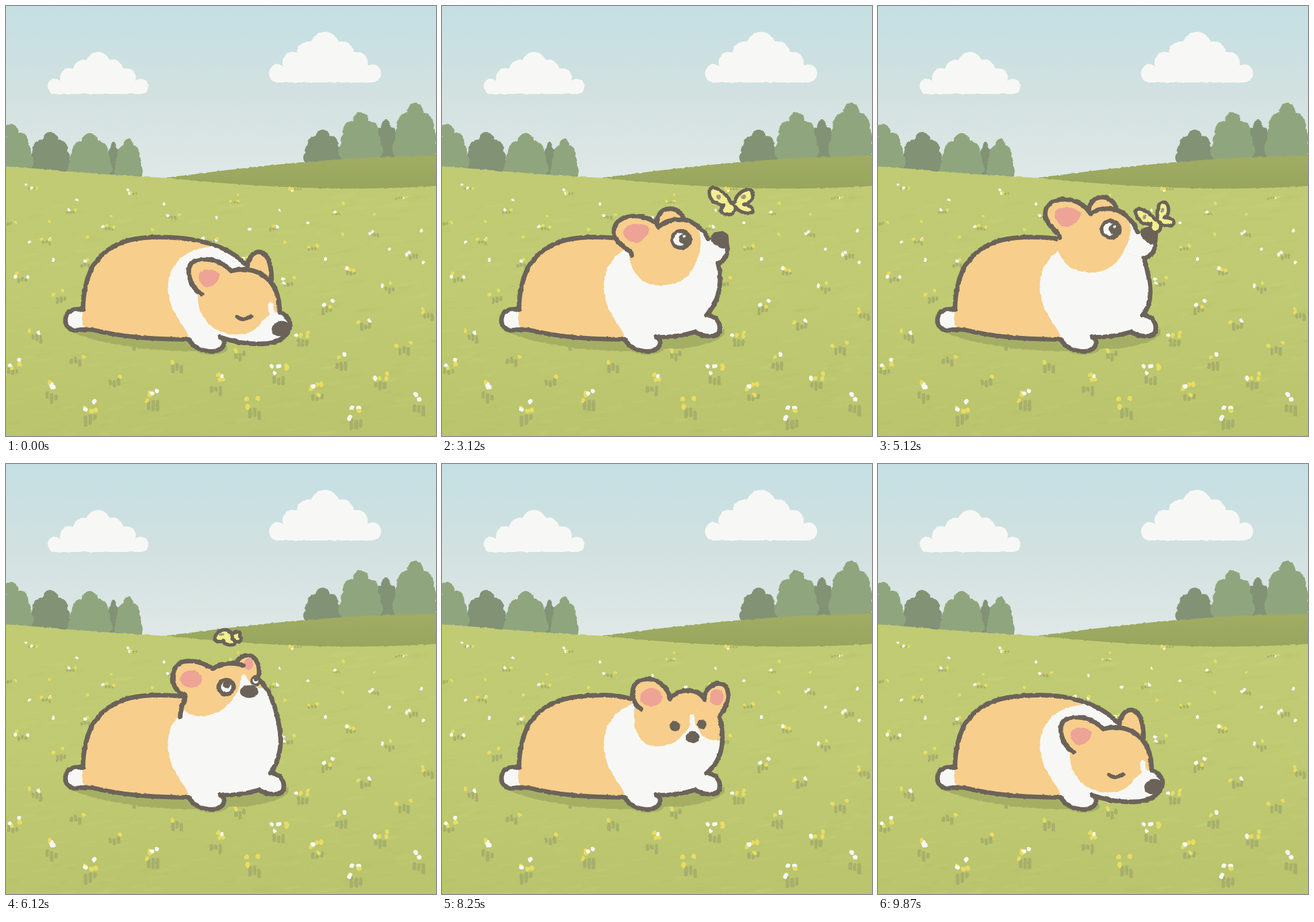
These frames come from a looping animation (748 by 748 pixels, 10 s). An HTML page with a canvas:

```html
<!DOCTYPE html>
<html lang="en">
<meta charset="utf-8">
<title>Corgi and butterfly</title>
<style>
  html, body { margin: 0; width: 100%; height: 100%; overflow: hidden; background: linear-gradient(#c5dfe3 0 38%, #bcc76f 42%); }
  canvas { display: block; width: 748px; height: 748px; filter: url(#rough); }
  svg { position: absolute; }
</style>
<svg width="0" height="0">
  <filter id="rough" x="0" y="0" width="1" height="1" color-interpolation-filters="sRGB">
    <feTurbulence type="fractalNoise" baseFrequency=".12" numOctaves="2" seed="4"/>
    <feColorMatrix values="1 0 0 0 0  0 1 0 0 0  0 0 1 0 0  0 0 0 0 1" result="noise"/>
    <feDisplacementMap in="SourceGraphic" in2="noise" scale="3.5" xChannelSelector="R" yChannelSelector="G"/>
  </filter>
</svg>
<canvas id="stage" width="748" height="748"></canvas>
<script>
const SIZE = 748, FRAME = 125, FRAMES = 80;
const INK = '#6b6359', COAT = '#f7ce8b', WHITE = '#f7f8f5', PINK = '#eda396', YELLOW = '#e9dc62';
const stage = document.getElementById('stage').getContext('2d');
const meadow = document.createElement('canvas');
meadow.width = meadow.height = SIZE;
let ctx = meadow.getContext('2d');

let seed = 77;
const rand = (lo, hi) => lo + (hi - lo) * ((seed = seed * 16807 % 2147483647) / 2147483647);
const ramp = (i, from, to) => Math.min(1, Math.max(0, (i - from) / (to - from)));

function paint(d, fill, line, width = 8) {
  const path = new Path2D(d);
  if (fill) { ctx.fillStyle = fill; ctx.fill(path); }
  if (line) {
    ctx.strokeStyle = line;
    ctx.lineWidth = width;
    ctx.lineCap = ctx.lineJoin = 'round';
    ctx.stroke(path);
  }
}

function oval(x, y, rx, ry, fill, turn = 0) {
  ctx.fillStyle = fill;
  ctx.beginPath();
  ctx.ellipse(x, y, rx, ry, turn, 0, 7);
  ctx.fill();
}

function fade(y0, y1, ...colors) {
  const g = ctx.createLinearGradient(0, y0, 0, y1);
  colors.forEach((c, i) => g.addColorStop(i / (colors.length - 1), c));
  return g;
}

// ---- Scenery ----
function cloud(x, bottom, w, h) {
  let base = `M${x - w * .42} ${bottom}`;
  for (let i = -3; i <= 3; i++) {
    const rise = (1 - Math.abs(i) / 3) ** .85, r = h * (.18 + .11 * rise);
    const px = x + i / 3 * (w / 2 - h * .18), py = bottom - h * .18 - h * .53 * rise;
    oval(px, py, r, r, WHITE);
    base += `L${px} ${py}`;
  }
  paint(`${base}L${x + w * .42} ${bottom}Z`, WHITE);
}

function tree(x, top, w, bottom, color) {
  const h = bottom - top;
  oval(x, top + .23 * h, .38 * w, .23 * h, color);
  for (let row = 1; row < 4; row++)
    for (const side of [-1, 1])
      oval(x + side * (.24 + .11 * row) * w, top + (.18 + .21 * row) * h, .46 * w, .21 * h, color);
  paint(`M${x} ${top + .2 * h} L${x + .8 * w} ${bottom + 6} L${x - .8 * w} ${bottom + 6}Z`, color);
}

// Tufts and flowers spread evenly by the golden ratio, larger towards the front
function flowers(count, tufted) {
  for (let i = 0; i < count; i++) {
    const x = (i * .618 + .06) % 1 * SIZE, y = 316 + i / count * (tufted ? 405 : 150) + rand(-6, 6);
    const near = (y - 300) / 430, size = 2.2 + 1.5 * near;
    if (tufted)
      for (let n = 0; n < 3; n++) {
        const left = x + (n - 1) * size * 2.2, low = y + rand(0, 8 * near);
        paint(`M${left} ${low} L${left} ${low + rand(3, 16) * near}`, null, '#a6b06b', 3.5 + 3 * near);
      }
    const blooms = tufted ? Math.round(rand(1, 2 + 4 * near)) : 1;
    for (let n = 0; n < blooms; n++)
      oval(x + rand(-14, 14), y - rand(0, 24) * near, size * 1.2, size, rand(0, 1) < .55 ? YELLOW : WHITE, rand(0, 3));
  }
}

function drawMeadow() {
  ctx.fillStyle = fade(0, 300, '#c4dfe3', '#d2e1e0', '#dfe8e6');
  ctx.fillRect(0, 0, SIZE, SIZE);
  cloud(160, 153, 175, 73);
  cloud(555, 133, 195, 88);

  const light = '#8fa57d', dark = '#829275';
  tree(661, 198, 24, 270, dark);
  tree(551, 215, 33, 275, dark);
  tree(617, 185, 38, 268, light);
  tree(712, 168, 39, 266, light);
  tree(187, 236, 14, 298, dark);
  tree(77, 219, 37, 292, dark);
  tree(8, 205, 39, 286, light);
  tree(146, 221, 38, 296, light);
  tree(213, 230, 24, 300, light);

  paint('M266 300 C380 287 520 264 748 260 L748 325 L266 325Z', fade(260, 320, '#a0ad62', '#98a55d'));
  paint('M0 279 C90 285 180 295 280 299 C400 311 560 325 748 313 L748 748 L0 748Z', fade(280, 748, '#c0cb74', '#bfca72', '#b9c46d'));
  for (let i = 0; i < 400; i++)
    oval(rand(0, SIZE), rand(330, SIZE), rand(6, 24), rand(1, 4), i % 3 ? 'rgba(205,218,120,.12)' : 'rgba(165,178,92,.08)', -.15);
  flowers(32, false);
  flowers(54, true);
}

// ---- Dog ----
const BACK = 'C208 402 174 417 150 454 C138 479 134 505 134 528 ';
const TAIL = 'C130 528 122 526 115 529 C101 534 100 553 110 561 C120 568 135 560 150 563 ';
const BELLY = 'C200 576 260 580 318 580 ';
const LEG = 'C326 594 342 601 358 601 C380 601 386 580 372 576 ';
const PAW = 'C400 577 420 573 440 567 C452 574 470 577 479 572 C488 562 483 538 460 538';
const CHEST = ' L380 560 L320 520Z';

const frontHigh = {
  ear: 'M303 440 C304 410 322 404 304 398 C284 388 286 350 308 344 C326 340 344 346 360 356 ',
  brow: 'C374 346 396 344 413 351 ',
  farEar: '401 346 C408 328 436 326 440 356 C441 364 439 370 437 373 ',
  cheek: 'C466 395 476 450 478 480 C477 505 470 525 460 538',
  mask: 'L412 366 C406 380 408 392 396 405 C385 425 365 438 340 438 C318 438 306 430 304 412',
  farMask: 'L452 390 C436 392 424 384 417 368 L412 366Z',
  blaze: 'M413 370 L416 385',
  pink: '322 374 19 15',
  farPink: '422 348 8 10',
  nose: '423 396 16 11',
  eye: '383 388 17 16 9',
  farEye: '434 377 9 10 5'
};
const frontLow = {
  ear: 'M346 426 C335 418 330 408 332 392 C335 376 352 372 366 375 C384 380 396 394 396 409 ',
  brow: 'C410 390 444 388 457 410 ',
  farEar: '457 410 C452 392 480 372 494 387 C503 402 494 425 482 440 ',
  cheek: 'C488 455 489 480 486 495 C482 515 472 528 460 538',
  mask: 'L437 438 C432 460 425 465 415 475 C402 488 392 491 372 491 C345 490 328 462 336 418',
  farMask: 'L485 481 C455 484 444 465 437 438 L437 438Z',
  blaze: 'M435 440 L435 466',
  pink: '364 406 19 16',
  farPink: '478 406 12 14',
  nose: '436 475 12 10.5',
  eye: '405 456 9 9 0',
  farEye: '452 453 8 8 0'
};

// Blends two poses number by number
function blend(a, b, k) {
  const pose = {};
  for (const key in a) {
    const ends = b[key].match(/[\d.]+/g);
    let i = 0;
    pose[key] = a[key].replace(/[\d.]+/g, n => +n + (ends[i++] - n) * k);
  }
  return pose;
}
const nums = s => s.split(' ').map(Number);

function drawBody(asleep, breath) {
  const top = `${265 + 18 * breath} 402 `;
  const start = asleep ? `M415 448 C385 416 330 402 ${top}` : `M340 412 C318 404 292 402 ${top}`;
  const coat = asleep ? `M350 413 C322 404 300 402 ${top}` : start;
  const collar = asleep ? '300 425 354 419Z' : '295 430 338 414Z';
  paint('M112 566 C160 590 270 602 330 600 C350 612 385 606 386 596 ' +
    (asleep ? 'L380 580 L150 560Z' : 'C420 600 500 585 491 562 L440 560 L150 560Z'), '#a5af64');
  const outline = start + BACK + TAIL + BELLY + LEG + (asleep ? '' : PAW);
  paint(outline, WHITE);
  paint(`${coat}${BACK}C130 540 133 552 138 562 L150 563 ${BELLY}C318 560 290 545 282 500 C278 460 ${collar}`, COAT);
  paint(outline, null, INK);
}

function drawSleepingHead(breath) {
  const ear = 'M340 501 C318 488 312 455 324 446 C345 434 375 443 392 461 ';
  const brow = 'C430 450 476 470 476 532 ';
  const snout = `C488 538 ${495 + breath} 546 ${494 + breath} 556 C492 572 478 584 455 587 C425 590 395 584 372 576`;
  paint('M420 452 C424 420 462 412 462 476', COAT, INK);
  paint(`${ear}${brow}${snout} L345 570 L325 530Z`, WHITE);
  paint(`${ear}${brow}C462 534 452 540 444 550 C436 564 422 571 400 571 C365 572 330 545 334 498Z`, COAT);
  paint('M460 520 C460 527 463 532 464 540', null, WHITE, 9);
  paint('M336 466 C340 457 364 455 372 467 C370 478 362 487 352 490 C342 489 333 478 336 466', PINK);
  paint(ear + brow + snout, null, INK);
  paint('M402 541 C408 546 420 546 426 540', null, INK, 7);
  oval(478 + breath, 561, 16, 13, INK, -.3);
}

// Looking right; lift 1 raises the head and tips the nose down
function drawSideHead(lift) {
  const top = 'M330 433 C328 421 301 417 299 393 C298 361 355 355 377 384 C395 368 425 366 443 382 ';
  const bridge = 'C452 388 459 396 463 405 ';
  const muzzle = '495 412 C500 432 491 446 480 447';
  const pose = new DOMMatrix().translate(414 - 11 * lift, 406 - 18 * lift).rotate(8 * lift).translate(-414, -406);
  const nape = pose.transformPoint({ x: 330, y: 433 }), chin = pose.transformPoint({ x: 480, y: 447 });
  const throat = `${chin.x} ${chin.y} C${chin.x + 8} ${chin.y + 30} 484 512 460 538`;
  paint(`M${nape.x} ${nape.y} L${throat}${CHEST}`, WHITE);
  paint('M' + throat, null, INK);

  ctx.save();
  ctx.transform(pose.a, pose.b, pose.c, pose.d, pose.e, pose.f);
  paint('M373 378 C375 346 410 346 420 368', COAT, INK);
  paint(`${top}${bridge}L${muzzle}Z`, WHITE);
  paint(`${top}C455 405 450 425 442 445 C432 473 410 486 378 486 C345 486 327 460 326 432Z`, COAT);
  paint('M316 390 C320 378 350 374 361 386 C362 394 348 412 338 413 C328 412 312 402 316 390', PINK);
  paint(top + bridge, null, INK);
  paint('M' + muzzle, null, INK);
  paint('M468 404 C468 394 490 388 497 399 C499 412 499 418 490 421 C482 420 470 412 468 404', INK, INK, 2);
  oval(416, 406, 19, 18, INK);
  oval(414, 406, 11, 11, WHITE);
  oval(421, 405, 9, 9, INK);
  oval(422, 401, 2.5, 2.5, WHITE);
  ctx.restore();
}

function drawFrontEye(spec, lid) {
  const [x, y, rx, ry, white] = nums(spec), r = Math.max(white, 0);
  oval(x, y, rx, Math.max(ry * lid, 2.5), INK);
  oval(x, y, r, r, WHITE);
  oval(x + r * .1, y - r * .45, r * .75, r * .65, INK);
}

function drawFrontHead(p, lid) {
  const top = p.ear + p.brow;
  paint(`${top}L${p.farEar}${p.cheek}${CHEST}`, WHITE);
  paint(`${top}${p.mask}Z`, COAT);
  paint(`M${p.farEar}${p.farMask}`, COAT);
  paint(p.blaze, null, WHITE, 9);
  oval(...nums(p.pink), PINK);
  oval(...nums(p.farPink), PINK);
  paint(top, null, INK);
  paint(`M${p.farEar}${p.cheek}`, null, INK);
  drawFrontEye(p.eye, lid);
  drawFrontEye(p.farEye, lid);
  oval(...nums(p.nose), INK);
}

// ---- Butterfly ----
const OPEN = ['M0 2 C-10 -20 -34 -32 -38 -20 C-40 -5 -28 4 -12 6 C-22 10 -20 22 -6 22 ' +
  'C2 22 8 16 8 9 C14 18 30 22 37 18 C42 12 32 6 22 4 C34 2 42 -10 36 -19 C26 -26 10 -16 6 0Z', 'M2 1 L8 9'];
const FOLDED = ['M8 4 C6 -10 14 -22 20 -16 C23 -10 19 -4 21 -2 C26 2 22 12 17 12 C13 12 10 8 8 4Z',
  'M8 4 C10 -14 2 -26 -8 -22 C-18 -18 -24 4 -19 9 C-14 13 -8 12 -6 9 C-8 18 4 24 11 20 C15 16 13 9 8 4Z'];

function drawButterfly(x, y, sx, sy, turn, wings) {
  const at = new DOMMatrix().translate(x, y).rotate(turn).scale(sx, sy);
  for (const d of wings) {
    const path = new Path2D();
    path.addPath(new Path2D(d), at);
    paint(path, '#f3ef90', INK, 6);
  }
  for (const dx of wings === OPEN ? [-22, 22] : [-9]) {
    const spot = at.transformPoint({ x: dx, y: -9 });
    oval(spot.x, spot.y, 4 * sx, 4 * sy, '#a09a80');
  }
}

// ---- Timing, in steps ----
const WAKE = 20, LAND = 30, LEAVE = 46, TURN = 47, GONE = 63, SLEEP = 71;
const flight = [[9, 752, 358], [19, 624, 350], [25, 503, 341], [31, 482, 370],
  [45, 482, 370], [49, 385, 302], [54, 285, 268], [62, -50, 300]];

function flyTo(i) {
  const n = Math.max(1, flight.findIndex(key => key[0] >= i));
  const [t0, x0, y0] = flight[n - 1], [t1, x1, y1] = flight[n], k = (i - t0) / (t1 - t0);
  return [x0 + (x1 - x0) * k, y0 + (y1 - y0) * k];
}

function draw(i) {
  const breath = i % 4 > 1 ? 1 : 0, asleep = i < WAKE || i >= SLEEP;
  ctx.drawImage(meadow, 0, 0);
  drawBody(asleep, breath);
  if (asleep) drawSleepingHead(breath);
  else if (i < TURN) drawSideHead(.6 * ramp(i, WAKE, 23) - .6 + ramp(i, 27, LAND));
  else drawFrontHead(blend(frontHigh, frontLow, ramp(i, 62, 66) ** 2), i > 68 ? .25 : 1);

  if (i > 9 && i < GONE - 1) {
    const shape = i < LAND ? [1, 1, 0] : i < LEAVE ? [.75, 1.05, -20] : [1.05, .6, 0];
    drawButterfly(...flyTo(i), ...shape, i % 7 < 3 ? FOLDED : OPEN);
  }
}

drawMeadow();
ctx = stage;
let shown = -1;
function tick() {
  const i = Math.floor((performance.now() % (FRAME * FRAMES) + 6) / FRAME) % FRAMES;
  if (i !== shown) draw(shown = i);
  requestAnimationFrame(tick);
}
tick();
</script>
</html>
```
